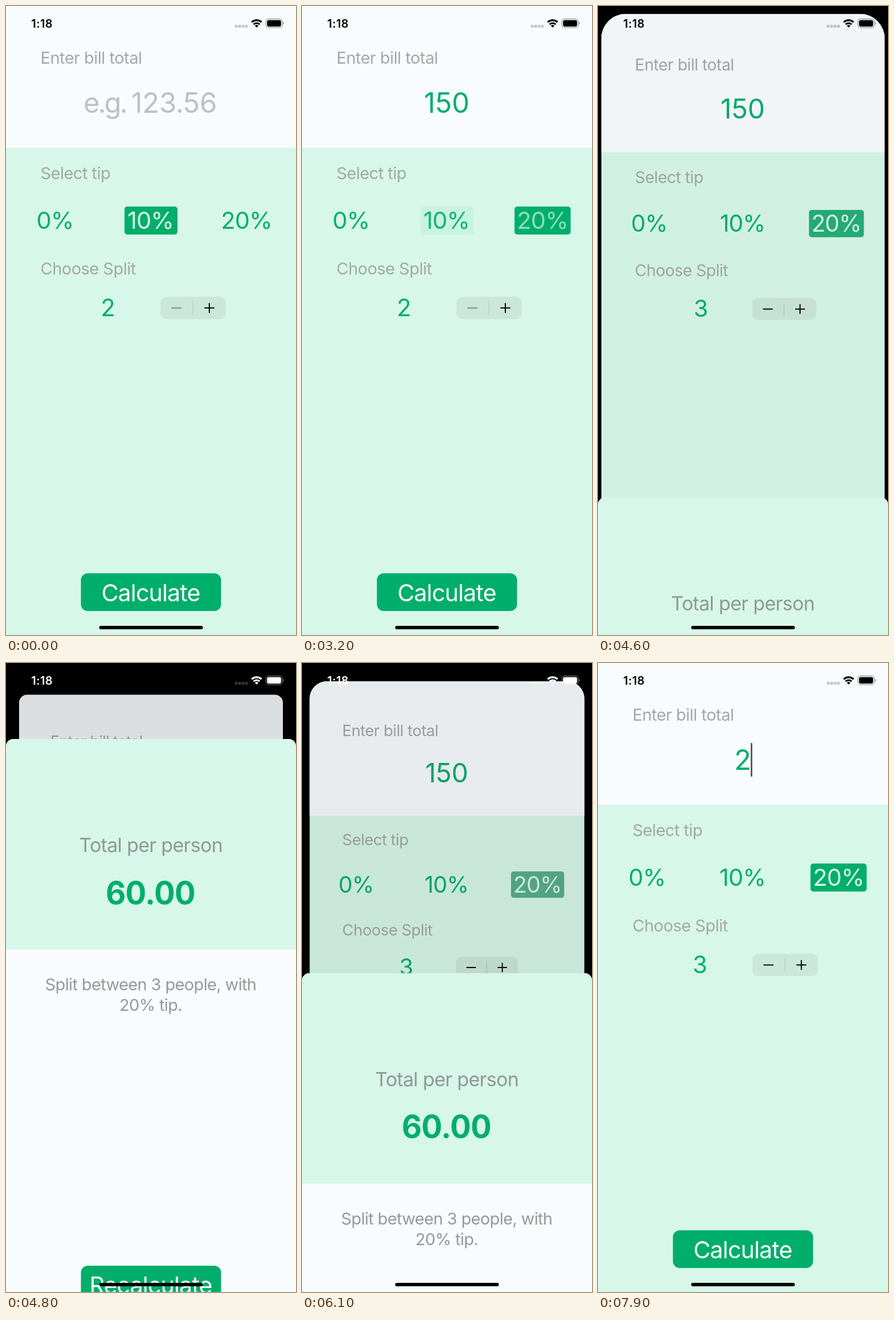
An HTML page that plays this animation: 509 px wide and 1101 px high, repeating every 8000 ms.

```html
<!DOCTYPE html>
<html lang="en">
<head>
<meta charset="utf-8">
<title>Tip calculator</title>
<style>
  html, body { margin: 0; width: 100%; height: 100%; overflow: hidden; background: #000; }
  svg { display: block; width: 509px; height: 1101px; }
  text {
    font-family: Inter, "Liberation Sans", sans-serif;
    font-optical-sizing: none;
    letter-spacing: -.022em;
    white-space: pre;
  }
  .label { font-size: 29px; letter-spacing: -.018em; fill: #a5a7a6; }
  .note { font-size: 29px; fill: #959998; text-anchor: middle; }
  .head { font-size: 34px; letter-spacing: -.02em; fill: #929896; text-anchor: middle; }
  .num { letter-spacing: 0; text-anchor: middle; fill: #00ae6b; }
  .bill { font-size: 49px; }
  .tip { font-size: 41.5px; letter-spacing: -.022em; }
  .total { font-size: 54.5px; font-weight: 700; letter-spacing: -.013em; }
  .btn { font-size: 41.2px; fill: #fff; text-anchor: middle; }
  .hint { font-size: 49px; fill: #bec1c2; }
  .clock { font-size: 20px; font-weight: 600; letter-spacing: .02em; }
</style>
</head>
<body>
<svg viewBox="0 0 509 1101" xmlns="http://www.w3.org/2000/svg">
  <defs>
    <clipPath id="cardClip"><rect id="cardShape" width="509" height="1101"/></clipPath>
    <clipPath id="sheetClip"><rect width="509" height="1200" rx="13"/></clipPath>
  </defs>
  <rect width="509" height="1101" fill="#000"/>

  <g id="card">
    <g clip-path="url(#cardClip)">
      <rect width="509" height="1101" fill="#d6f7e9"/>
      <rect width="509" height="248" fill="#f8fcfe"/>
      <text class="label" x="60.5" y="101">Enter bill total</text>
      <g id="hint" class="hint">
        <text x="136" y="187" style="letter-spacing:-.062em">e.g.</text>
        <text x="219.5" y="187" style="letter-spacing:-.004em">123.56</text>
      </g>
      <text id="bill" class="num bill" x="254" y="187"></text>
      <rect id="caret" y="140" width="2.6" height="59" rx="1" fill="#454a49"/>

      <text class="label" x="60.5" y="303">Select tip</text>
      <rect id="box10" x="208" y="351" width="93" height="49" rx="5" fill="#00ae6b"/>
      <rect id="box20" x="373" y="351" width="98.5" height="49" rx="5"/>
      <text class="num tip" x="86" y="390">0%</text>
      <text id="tip10" class="num tip" x="253.5" y="390">10%</text>
      <text id="tip20" class="num tip" x="422" y="390">20%</text>

      <text class="label" x="60.5" y="470">Choose Split</text>
      <text id="split" class="num" x="179" y="542.5" font-size="42"></text>
      <rect x="271" y="509" width="115" height="39" rx="10" fill="#cbe7db"/>
      <path id="press" d="M328.5 509H376a10 10 0 0 1 10 10v19a10 10 0 0 1-10 10H328.5z" fill="#000"/>
      <path d="M328.2 517v23" stroke="#b5cfc3" stroke-width="1.4"/>
      <path id="minus" d="M290.5 528.6h17.5" stroke-width="1.9"/>
      <path d="M348.2 528.6h17.4M356.9 519.9v17.4" stroke="#000" stroke-width="2"/>

      <rect x="131.5" y="993" width="246" height="66" rx="12" fill="#00ae6b"/>
      <text id="calc" class="btn" x="254" y="1042">Calculate</text>
      <rect id="dim" width="509" height="1101" fill="#000"/>
    </g>
  </g>

  <g id="sheet">
    <g clip-path="url(#sheetClip)">
      <rect width="509" height="1200" fill="#f8fcfe"/>
      <rect width="509" height="368.5" fill="#d6f7e9"/>
      <text class="head" x="254.2" y="198">Total per person</text>
      <text class="num total" x="253.5" y="288.5">60.00</text>
      <text class="note" x="254" y="440">Split between 3 people, with</text>
      <text class="note" x="254" y="476">20% tip.</text>
      <rect x="131.5" y="922" width="246" height="66" rx="12" fill="#00ae6b"/>
      <text id="recalc" class="btn" x="254" y="971">Recalculate</text>
    </g>
  </g>

  <g id="status">
    <text class="clock" x="44.3" y="37.5">1:18</text>
    <g opacity=".2">
      <rect x="401.5" y="33" width="5" height="5" rx="1.2"/>
      <rect x="407.5" y="33" width="5" height="5" rx="1.2"/>
      <rect x="413.5" y="33" width="5" height="5" rx="1.2"/>
      <rect x="419.5" y="33" width="5" height="5" rx="1.2"/>
    </g>
    <g id="wifi" fill="none" stroke-width="3.1">
      <path d="M431.2 28.4a12.6 12.6 0 0 1 17.4 0"/>
      <path d="M434.6 32.2a7.6 7.6 0 0 1 10.6 0"/>
    </g>
    <path d="M439.9 37.8l-3.2-3.3a4.6 4.6 0 0 1 6.4 0z"/>
    <rect id="shell" x="456.2" y="22.7" width="28.6" height="15.2" rx="4.6" fill="none" stroke-width="1.2" stroke-opacity=".42"/>
    <rect x="458.2" y="24.7" width="24.6" height="11.2" rx="2.8"/>
    <path d="M486.4 27.8a2.8 2.8 0 0 1 0 5z" opacity=".45"/>
  </g>
  <rect x="163.5" y="1085" width="182" height="6" rx="3" fill="#000"/>
</svg>
<script>
const LOOP = 8000, STEP = 100;
const GREEN = [0, 174, 107], LIGHT = [214, 249, 234], FADED = [164, 172, 168];
const el = {};
document.querySelectorAll('[id]').forEach(n => el[n.id] = n);

const set = (node, attrs) => {
  for (const k in attrs) node.setAttribute(k, attrs[k]);
};
const mix = (a, b, p) => `rgb(${a.map((v, i) => Math.round(v + (b[i] - v) * p))})`;

// Linear track through [time, value] points
function track(t, pts) {
  if (t <= pts[0][0]) return pts[0][1];
  for (let i = 1; i < pts.length; i++) {
    const [t0, v0] = pts[i - 1], [t1, v1] = pts[i];
    if (t < t1) return v0 + (v1 - v0) * (t - t0) / (t1 - t0);
  }
  return pts[pts.length - 1][1];
}

// Last value whose time has come
const hold = (t, pts) => pts.filter(p => p[0] <= t).pop()[1];

// Critically damped spring, 0 to 1
function spring(ms) {
  const z = Math.max(0, ms) * 0.018;
  return 1 - (1 + z) * Math.exp(-z);
}

const BILL = [[0, ''], [1300, '1'], [1700, '15'], [1800, '150'],
  [7600, '15'], [7700, '1'], [7800, ''], [7900, '2']];
const CARET = [[600, 0], [800, 1], [2200, 1], [2500, 0], [2600, 0], [2800, 1],
  [2900, 1], [3000, 0], [7200, 0], [7400, 1]];

function drawForm(t, p) {
  const bill = hold(t, BILL);
  el.bill.textContent = bill;
  set(el.hint, { opacity: bill ? 0 : 1 });
  const half = bill ? el.bill.getComputedTextLength() / 2 : 0;
  set(el.caret, { x: 253.2 + half, opacity: track(t, CARET) });

  const old = track(t, [[3030, 1], [3212, 0]]);
  const picked = t >= 3100;
  set(el.box10, { opacity: old });
  el.tip10.style.fill = mix(GREEN, LIGHT, old);
  set(el.box20, { opacity: picked ? 1 : 0, fill: mix(GREEN, FADED, p) });
  el.tip20.style.fill = mix(GREEN, LIGHT, picked ? 1 : 0);
  set(el.tip20, { opacity: t < 3000 ? 1 : track(t, [[3050, .4], [3400, 1]]) });

  const three = t >= 3800;
  el.split.textContent = three ? 3 : 2;
  set(el.minus, { stroke: three ? '#000' : '#73867e' });
  set(el.press, { opacity: track(t, [[3600, 0], [3750, .1], [3800, .1], [4000, 0]]) });
  set(el.calc, { opacity: t >= 4500 && t < 5000 ? .35 : 1 });
}

function drawSheet(t, p) {
  const scale = 1 - 49 / 509 * p;
  set(el.card, { transform: `translate(${24.5 * p} ${59 * p}) scale(${scale})` });
  set(el.cardShape, { rx: p > .001 ? (53 - 41 * p) / scale : 0 });
  set(el.dim, { opacity: .125 * p });
  set(el.sheet, { transform: `translate(0 ${1101 - 1030 * p})` });
  set(el.recalc, { opacity: t >= 5900 && t < 6600 ? .35 : 1 });

  const ink = t >= 4700 && t < 6200 ? '#fff' : '#000';
  set(el.status, { fill: ink });
  set(el.wifi, { stroke: ink });
  set(el.shell, { stroke: ink });
}

function draw(now) {
  const t = Math.floor(now % LOOP / STEP) * STEP;
  const p = t < 6000 ? spring(t - 4549) : 1 - spring(t - 6014);
  drawForm(t, p);
  drawSheet(t, p);
}

function loop() {
  draw(performance.now());
  requestAnimationFrame(loop);
}
loop();
</script>
</body>
</html>
```
